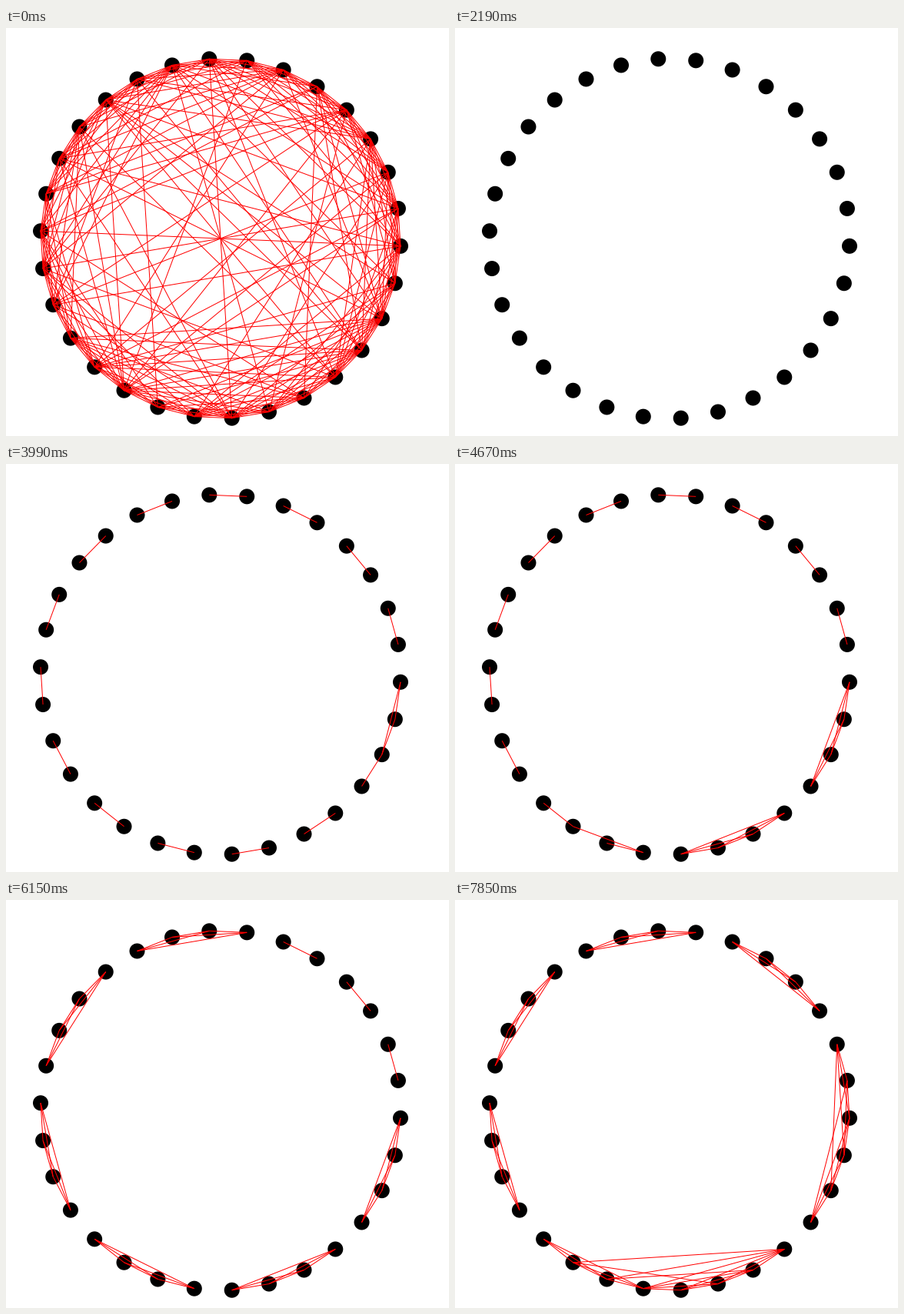
Animation of 576x531 px, one loop 8000 ms. Source, as a matplotlib script:

```python
import math
import random

import matplotlib.pyplot as plt
from matplotlib.animation import FuncAnimation
from matplotlib.collections import LineCollection
from matplotlib.patches import Circle

W, H, DPI = 576, 531, 100
LOOP, STEP = 8000, 20
NODES = 30
CX, CY, R = 279, 274, 234.2
CLEAR, TICK = 2190, 77.5
FIRST, LAST = 3, 73

# Nodes that turn out to be equal when compared.
EQUAL = {(2, 28), (5, 9), (6, 10)}


def place(k):
    a = math.radians(2.4 + 360 / NODES * k)
    return CX + R * math.cos(a), CY + R * math.sin(a)


def merge(left, right):
    """Yield the comparisons needed to join two groups of distinct nodes."""
    free = list(left)
    for v in right:
        for u in free:
            yield u, v
            if (u, v) in EQUAL:
                free.remove(u)
                break


def sorting_run():
    """Pairs first, then groups of four, then larger groups."""
    for i in range(0, NODES, 2):
        yield i, i + 1
    for i in range(0, 28, 4):
        yield from merge([i, i + 1], [i + 2, i + 3])
    yield from merge(range(4), range(28, 30))
    yield from merge(range(4, 8), range(8, 12))


def finished_run(rng):
    """All near neighbours, and fewer links the farther apart two nodes are."""
    for u in range(NODES):
        for v in range(u + 1, NODES):
            gap = min(v - u, NODES - v + u)
            chance = max(0.2, math.exp((3 - gap) / 6))
            if rng.random() < chance:
                yield u, v


points = [place(k) for k in range(NODES)]


def segments(edges):
    return [(points[u], points[v]) for u, v in edges]


full = segments(finished_run(random.Random(8)))
growing = segments(sorting_run())

# The drawing rests for one tick at a steady rhythm.
rests = {int(8.55 + 4.6 * j) for j in range(15)}
times = [CLEAR + TICK * t for t in range(FIRST, LAST + 1) if t not in rests]
times.append(times[-1])

fig = plt.figure(figsize=(W / DPI, H / DPI), dpi=DPI, facecolor="white")
ax = fig.add_axes([0, 0, 1, 1])
ax.set_xlim(0, W)
ax.set_ylim(H, 0)
ax.axis("off")

for p in points:
    ax.add_patch(Circle(p, 10, facecolor="black", linewidth=0, zorder=1))
lines = LineCollection([], colors="#ff0000", linewidths=72 / DPI, zorder=2)
ax.add_collection(lines, autolim=False)


def draw(i):
    now = (i + 0.5) * STEP
    if now < CLEAR:
        lines.set_segments(full)
    else:
        lines.set_segments(growing[:sum(t <= now for t in times)])
    return (lines,)


anim = FuncAnimation(fig, draw, frames=LOOP // STEP, interval=STEP,
                     repeat=True, repeat_delay=0, blit=False)
plt.show()
```
